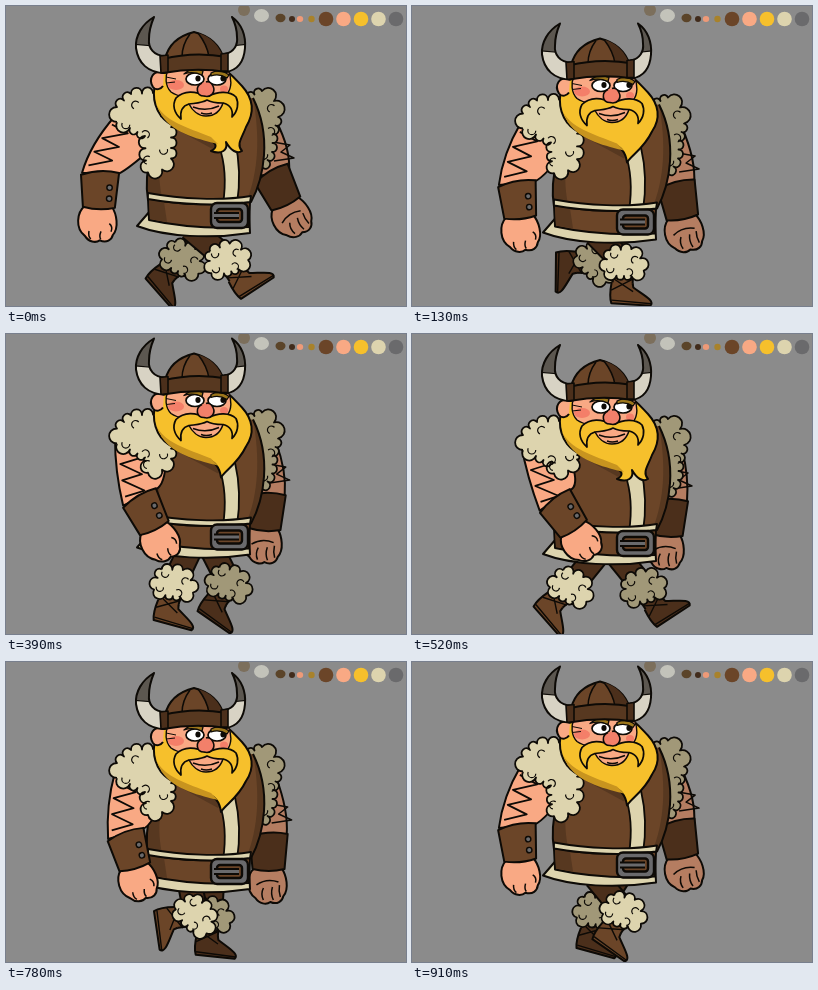
Recreate the animation shown at these times as an HTML page with a canvas. Size 400 px wide and 300 px high, loop 1.04 s.

```html
<!DOCTYPE html>
<html lang="en">
<head>
<meta charset="utf-8">
<title>Viking walk</title>
<style>
html, body { margin: 0; width: 100%; height: 100%; overflow: hidden; background: #8b8b8b; }
canvas { display: block; }
</style>
</head>
<body>
<canvas id="stage" width="400" height="300"></canvas>
<script>
const ctx = document.getElementById('stage').getContext('2d');
const STEP = 130, POSES = 8;
const INK = '#0d0a06', BROWN = '#6b4528', SHADE = '#573820', DARK = '#4b2f1b',
  SKIN = '#f9a984', SKIN_DARK = '#b57d61', GOLD = '#f6c02c', GOLD_DARK = '#c8941f',
  CREAM = '#ddd4ae', CREAM_DARK = '#a19878', GREY = '#6a6a6c';

const rad = deg => deg * Math.PI / 180;

// Walk cycle: u is the fraction of the cycle, 0 when the leg reaches forward.
const bob = u => 6.5 * Math.sin(4 * Math.PI * u);

// Arm swing from -1 (back) to 1 (forward), quick through the extremes.
function swing(u) {
  const c = Math.cos(2 * Math.PI * u);
  return -Math.sign(c) * Math.abs(c) ** 1.6;
}

// The near arm hangs from the shoulder and foreshortens as it comes forward.
function nearArm(u, dy) {
  const s = swing(u), upper = rad(23 * s - 10), length = 61 - 5 * s;
  return { x: 130 + length * Math.sin(upper), y: 112 + dy + length * Math.cos(upper), turn: 16 + 18 * s };
}

function farArm(u, dy) {
  const s = swing(u), ahead = (1 - s) / 2;
  return { x: 257 + 8 * Math.sqrt(ahead), y: 167 + 1.3 * dy + 6 * (1 - Math.abs(s)), turn: 30 * ahead ** 3 - 4 };
}

// The shin stays upright in stance, folds back mid-swing and kicks out before contact.
function shinAngle(u) {
  const pulse = (center, width) => {
    const d = u - center - Math.round(u - center);
    return Math.exp(-((d / width) ** 2));
  };
  return 5 + 90 * pulse(.67, .2) - 44 * pulse(0, .07);
}

function legPose(u, dy, middle, stride) {
  const x = middle + stride * Math.cos(2 * Math.PI * u), y = 253 + .6 * dy;
  const angle = shinAngle(u), a = rad(angle);
  return { x, y, angle, ax: x - 28 * Math.sin(a), ay: y + 28 * Math.cos(a) };
}

function draw(d, fill, line = 2) {
  const path = new Path2D(d);
  if (fill) { ctx.fillStyle = fill; ctx.fill(path); }
  if (line) { ctx.lineWidth = line; ctx.strokeStyle = INK; ctx.stroke(path); }
}

function oval(x, y, rx, ry, fill, line = 0) {
  ctx.beginPath();
  ctx.ellipse(x, y, rx, ry, 0, 0, 7);
  ctx.fillStyle = fill;
  ctx.fill();
  if (line) { ctx.lineWidth = line; ctx.strokeStyle = INK; ctx.stroke(); }
}

function at(x, y, deg, paint) {
  ctx.save();
  ctx.translate(x, y);
  ctx.rotate(rad(deg));
  paint();
  ctx.restore();
}

function limb(x1, y1, x2, y2, width, fill) {
  for (const [w, color] of [[width + 4, INK], [width, fill]]) {
    ctx.beginPath();
    ctx.moveTo(x1, y1);
    ctx.lineTo(x2, y2);
    ctx.lineWidth = w;
    ctx.strokeStyle = color;
    ctx.stroke();
  }
}

// Clockwise outline with outward scallops and a few curls inside.
function fur(points, fill, size = 11) {
  const n = points.length;
  const cx = points.reduce((s, p) => s + p[0], 0) / n;
  const cy = points.reduce((s, p) => s + p[1], 0) / n;
  ctx.beginPath();
  ctx.moveTo(...points[0]);
  points.forEach(([x, y], i) => {
    const [nx, ny] = points[(i + 1) % n];
    const parts = Math.max(1, Math.round(Math.hypot(nx - x, ny - y) / size));
    const dx = (nx - x) / parts, dy = (ny - y) / parts;
    for (let k = 0; k < parts; k++) {
      const px = x + dx * k, py = y + dy * k;
      ctx.bezierCurveTo(px + dy * .7, py - dx * .7, px + dx + dy * .7, py + dy - dx * .7, px + dx, py + dy);
    }
  });
  ctx.fillStyle = fill;
  ctx.fill();
  ctx.lineWidth = 1.8;
  ctx.strokeStyle = INK;
  ctx.stroke();
  ctx.lineWidth = 1.2;
  points.forEach(([x, y], i) => {
    if (i % 2) return;
    ctx.beginPath();
    ctx.arc(x + (cx - x) * .3, y + (cy - y) * .3, size * .36, i, i + 3.6);
    ctx.stroke();
  });
}

function forearm({ x, y, turn }, near) {
  at(x, y, -turn, () => {
    draw('M-14 33C-22 40-23 56-13 63C-9 69-2 70 2 67C9 70 14 66 15 61C21 54 18 40 13 33Z', near ? SKIN : SKIN_DARK);
    draw(near ? 'M-9 58q-1 5 2 8M3 58q-2 5 0 8M11 50q4 3 2 8'
      : 'M-12 50Q-2 43 10 47M-5 53q-3 6 0 12M4 52q-2 7 1 13M11 50q-1 6 1 12', null, 1.5);
    draw('M-19 2Q0-5 19-1L16 34Q0 38-16 34Z', near ? BROWN : DARK);
    if (near) for (const dot of [14, 25]) oval(10, dot, 2.7, 2.7, GREY, 1.4);
  });
}

function drawNearArm(arm, dy) {
  const c = 18 * Math.cos(rad(arm.turn)), s = 18 * Math.sin(rad(arm.turn));
  const sx = 109, sy = 110 + dy;
  const lx = arm.x - c, ly = arm.y + s, rx = arm.x + c, ry = arm.y - s;
  const mx = lx * .6 + sx * .4 - 5, my = (sy + ly) / 2;
  draw(`M${sx} ${sy}Q${mx} ${my} ${lx} ${ly}L${rx} ${ry}Q${rx + 10} ${ry - 4} 160 ${130 + dy}L140 ${100 + dy}Z`, SKIN);
  ctx.beginPath();
  for (let k = 0; k < 7; k++) {
    const t = .15 + k * .12, v = 1 - t;
    ctx.lineTo(v * v * sx + 2 * v * t * mx + t * t * lx + (k % 2 ? 25 : 4), sy + (ly - sy) * t + (k % 2) * 2);
  }
  ctx.lineWidth = 1.8;
  ctx.stroke();
  forearm(arm, true);
  const hem = 165 - .75 * arm.turn;
  fur([[111, 116], [111, 101], [125, 88], [147, 87], [159, 99], [165, 121], [165, hem - 14], [156, hem - 3],
    [142, hem], [140, hem - 12], [139, 130], [124, 122]].map(([x, y]) => [x, y + dy]), CREAM);
}

function drawFarArm(arm, dy) {
  const { x, y } = arm;
  draw(`M250 ${115 + dy}L270 ${115 + dy}Q${x + 20} ${y - 24} ${x + 18} ${y}L${x - 17} ${y + 3}Z`, SKIN_DARK);
  draw(`M${x + 2} ${y - 31}L${x + 19} ${y - 28}L${x + 10} ${y - 21}L${x + 23} ${y - 15}L${x + 3} ${y - 12}`, null, 1.5);
  forearm(arm, false);
  fur([[241, 92], [256, 85], [268, 95], [272, 111], [267, 128], [266, 146], [257, 162], [248, 140]]
    .map(([px, py]) => [px, py + dy]), CREAM_DARK);
}

function drawLeg({ x, y, ax, ay, angle }, hipX, hipY, near) {
  const leather = near ? BROWN : DARK;
  limb(hipX, hipY, x, y, 22, DARK);
  limb(x, y, ax, ay, 18, leather);
  at(ax, ay, angle, () => {
    draw('M-11-8C-12 0-12 8-10 13L29 13C34 8 22 3 11-4L10-8', leather);
    draw('M-10 10L30 11M-10-12L11 0M11-13L-11 0', null, 1.4);
  });
  at(x, y, angle * .5, () =>
    fur([[-14, -12], [7, -14], [16, -5], [20, 7], [8, 13], [-7, 13], [-19, 9], [-17, -3]],
      near ? CREAM : CREAM_DARK, 10));
}

function drawTorso() {
  const body = 'M166 98C148 125 137 165 142 194C165 200 215 202 245 196C258 172 266 130 247 92';
  draw('M144 205L131 220C160 231 205 233 244 227L243 205Z', CREAM);
  draw(body, BROWN, 0);
  draw('M166 98C148 125 137 165 142 194L157 196C150 165 153 140 168 122L212 146L240 114Z', SHADE, 0);
  draw('M247 92C254 130 253 165 240 197L245 196C258 172 266 130 247 92Z', SHADE, 0);
  draw('M213 140Q222 165 217 198L231 198Q236 165 229 135Z', CREAM, 1.8);
  draw(body, null);
  draw('M142 193C175 199 215 200 244 196L243 221C205 223 170 220 143 214Z', BROWN);
  draw('M143 194L158 196L161 216L144 213Z', SHADE, 0);
  draw('M142 187C175 193 215 195 245 190L244 196C215 200 175 199 142 193Z', CREAM, 1.8);
  ctx.beginPath();
  ctx.roundRect(205, 197, 37, 25, 6);
  ctx.roundRect(211, 203, 25, 13, 3);
  ctx.fillStyle = GREY;
  ctx.fill('evenodd');
  ctx.lineWidth = 2.4;
  ctx.stroke();
  limb(208, 209.5, 233, 209.5, 3, GREY);
}

function drawHorn(d, tip) {
  draw(d, '#d8d3c4', 0);
  ctx.save();
  ctx.clip(new Path2D(d));
  draw(tip, '#5c5750', 1.2);
  ctx.restore();
  draw(d, null);
}

function drawHelmet() {
  drawHorn('M159 50C148 50 142 42 143 33C143 25 145 18 148 11C136 18 129 30 130 42C132 57 142 67 159 67Z', 'M126 38L148 40V5H126Z');
  drawHorn('M219 48C228 46 232 39 231 31C231 23 229 17 226 11C236 18 240 30 239 42C238 55 232 64 220 66Z', 'M225 40L243 38V5H222Z');
  draw('M159 53C162 40 172 30 188 26C204 30 214 40 218 53Z', BROWN);
  draw('M192 27C199 36 202 44 203 52L218 53C214 40 204 30 192 27Z', DARK, 0);
  draw('M184 28C178 36 176 44 176 51M192 27C199 36 202 44 203 51', null, 1.5);
  draw('M157 53Q188 45 221 51L221 66Q190 61 157 67Z', SHADE);
  draw('M154 50L162 49V66L155 67ZM215 48L222 47V65L215 65Z', DARK, 1.6);
}

function drawHead(flared) {
  const tip = flared
    ? 'C210 136 213 141 205 145C216 149 222 144 220 136C225 145 231 148 236 145C230 138 236 132 240 121'
    : 'C211 134 214 142 215 150C219 143 232 136 240 119';
  draw(`M155 66C146 78 145 96 155 110C166 124 190 128 200 132${tip}C249 106 247 92 236 80C232 76 229 72 222 66Z`, GOLD);
  draw('M149 96C158 116 181 121 205 131L212 138C196 134 168 128 156 110Z', GOLD_DARK, 0);
  draw('M158 67C147 63 142 73 147 81C150 85 155 83 157 80', SKIN);
  draw('M162 64H222C226 72 226 82 221 88C213 92 206 93 200 93C186 93 172 91 165 86C159 80 159 70 162 64Z', SKIN, 1.4);
  oval(170, 79, 8, 5, '#f47f69');
  oval(218, 83, 4, 3.5, '#f47f69');
  draw('M160 71l10 2M160 77l9-1', null, 1);
  oval(189, 73, 9, 6, '#fff', 1.7);
  oval(211, 73, 9, 6, '#fff', 1.7);
  oval(192, 72.5, 2.6, 2.9, INK);
  oval(217, 72.5, 2.6, 2.9, INK);
  draw('M178 68Q186 60 197 65L196 69Q187 65 178 68ZM205 67Q214 62 223 69L221 72Q213 67 205 70Z', '#9c761b', 1.3);
  // Moustache over the cheeks, with its drooping ends drawn as lines on the beard.
  draw('M199 90C190 85 178 84 170 92L178 100L200 96L222 99L230 91C224 85 212 85 203 90Z', GOLD, 0);
  draw('M199 90C190 85 178 84 170 92C166 99 168 107 175 113C174 106 176 100 183 98', null, 1.7);
  draw('M203 90C212 85 224 85 230 91C233 97 232 105 226 111C227 105 225 99 217 97', null, 1.7);
  draw('M183 98C190 97 196 97 201 94C206 97 212 97 217 97C214 106 208 110 200 110C192 110 186 104 183 98Z', SKIN, 1.5);
  draw('M187 101Q200 106 213 100M195 107Q200 109 206 107', null, 1.4);
  draw('M196 77C189 80 190 90 198 90C205 92 210 86 207 80C205 76 202 75 200 76', '#f2806a', 1.6);
  drawHelmet();
}

function drawPalette() {
  oval(238, 4, 6, 6, '#7c6f5c');
  oval(255.5, 9.5, 7.5, 6.5, '#c3c3ba');
  oval(274.5, 12, 5, 4.2, '#5b4429');
  oval(286, 13, 3, 3, '#412b1b');
  oval(294, 13, 3.2, 3, '#ee9a78');
  oval(305.5, 13, 3.2, 3.2, '#a8822b');
  [BROWN, SKIN, GOLD, CREAM, GREY].forEach((color, i) => oval(320 + i * 17.5, 13, 7.3, 7.3, color));
}

function render(now) {
  const pose = Math.floor(now / STEP) % POSES, u = pose / POSES, dy = bob(u);
  ctx.fillStyle = '#8b8b8b';
  ctx.fillRect(0, 0, 400, 300);
  ctx.lineJoin = 'round';
  drawPalette();
  drawFarArm(farArm(u, dy), dy);
  drawLeg(legPose((u + .5) % 1, dy, 204, 27), 206, 222 + dy, false);
  drawLeg(legPose(u, dy, 190, 31), 184, 222 + dy, true);
  at(0, dy, 0, drawTorso);
  drawNearArm(nearArm(u, dy), dy);
  at(0, dy, 0, () => drawHead(pose % 4 === 0));
}

const start = performance.now();
function tick() {
  render(performance.now() - start);
  requestAnimationFrame(tick);
}
tick();
</script>
</body>
</html>
```
